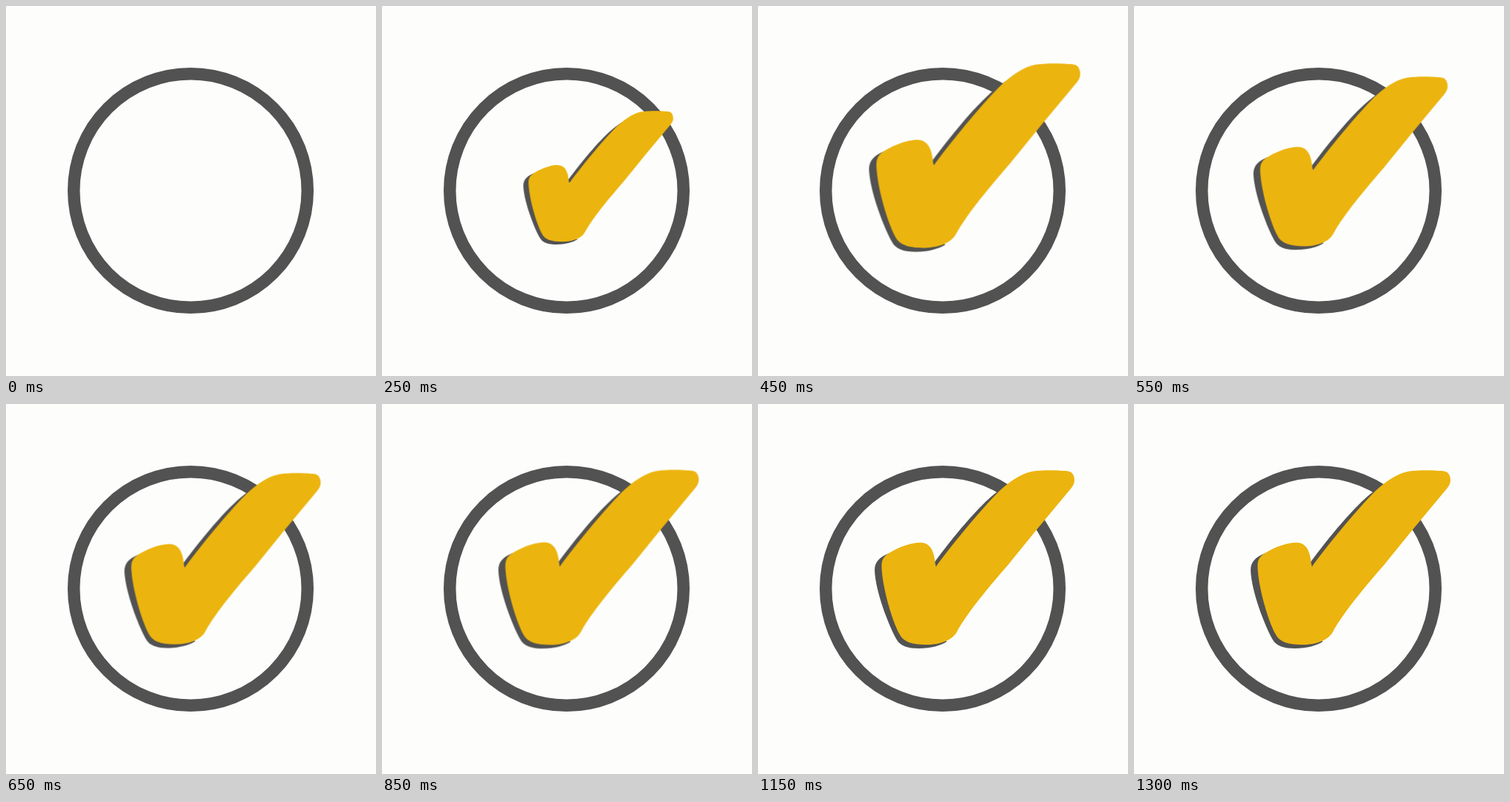
These frames come from a looping animation (498x498 px, 1350 ms). An HTML page without scripts:

```html
<!DOCTYPE html>
<html lang="en">
<head>
<meta charset="utf-8">
<title>Check mark</title>
<style>
  html, body { margin: 0; width: 100%; height: 100%; overflow: hidden; background: #fdfefc; }
  svg { display: block; width: 100%; height: 100%; }
  .ring { fill: none; stroke: #525252; stroke-width: 16.5; }
  .shade { fill: #525252; }
  .face { fill: #ecb40e; }
  .check { transform-origin: 290px 297px; animation: spring 1350ms step-end infinite; }

  /* Damped spring, one pose every 50 ms */
  @keyframes spring {
    0% { transform: scale(0); }
    11.111% { transform: scale(.05); }
    14.814% { transform: scale(.3); }
    18.518% { transform: scale(.75); }
    22.222% { transform: scale(1.06); }
    25.925% { transform: scale(1.17); }
    29.629% { transform: scale(1.14); }
    33.333% { transform: scale(1.057); }
    37.037% { transform: scale(.998); }
    40.740% { transform: scale(.972); }
    44.444% { transform: scale(.973); }
    48.148% { transform: scale(.982); }
    51.851% { transform: scale(.996); }
    55.555% { transform: scale(1.004); }
    59.259% { transform: scale(1.005); }
    62.962% { transform: scale(1.003); }
    66.666%, 100% { transform: scale(1); }
  }
</style>
</head>
<body>
<svg viewBox="0 0 498 498">
  <circle class="ring" cx="248.5" cy="248.5" r="157.3"/>
  <g class="check">
    <path class="shade" d="M176 201C164 206 157 212 157 224C158 252 176 298 186 316C191 326 202 329 217 329C232 329 246 325 254 320L240 300L200 200Z"/>
    <path class="shade" d="M237.500 213C262 180 296 138 322 118C334 109 342 105 348 101L320 140L240 222Z"/>
    <path class="face" d="M239 219.500C238 206 236 187 219 186.500C205 186 184 195 173 203C167 208 166 213 166.500 222C168 248 180 290 190 309C195 320 207 324 227 324C245 324 262 318 268 306C283 279 312 245 337 216L376 168L421 114C426 108 427 103 425 97C423 91 419 90 411 90C402 89 378 89 368 91C353 94 338 105 325 117C303 139 270 178 239 219.500Z"/>
  </g>
</svg>
</body>
</html>
```
